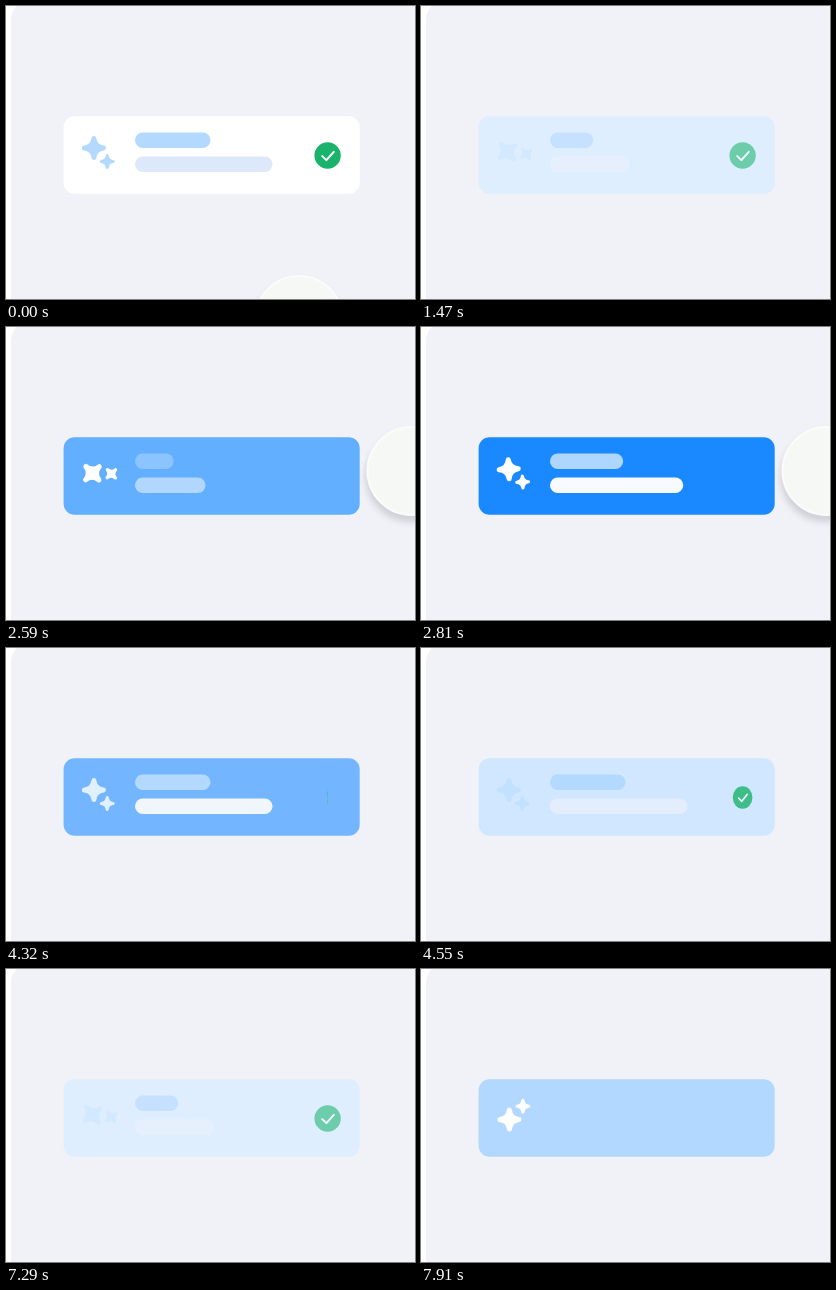
Write an HTML page that moves like this. It is 409 px wide and 293 px high and loops after 8 s.

```html
<!DOCTYPE html>
<html lang="en">
<head>
<meta charset="utf-8">
<title>Task card</title>
<style>
  html, body { margin: 0; width: 100%; height: 100%; overflow: hidden; background: #fff; }
  svg { display: block; width: 409px; height: 293px; }
  #disc { filter: drop-shadow(-1px 6px 3px rgba(110, 112, 115, .25)); }
</style>
</head>
<body>
<svg viewBox="0 0 409 293">
  <defs>
    <path id="star" d="M0-9.5Q1-1 9.5 0Q1 1 0 9.5Q-1 1-9.5 0Q-1-1 0-9.5Z" stroke-width="5" stroke-linejoin="round"/>
  </defs>
  <rect x="5" y="-6" width="430" height="320" rx="20" fill="#f0f2f8"/>
  <rect id="card" x="57.6" y="110.2" width="296.1" height="77.5" rx="11"/>
  <g id="stars">
    <use href="#star" x="-4.5" y="-4"/>
    <use href="#star" transform="translate(8.8 9.5) scale(.62)"/>
  </g>
  <g id="bars">
    <rect id="title" x="129" y="126.5" height="15.5" rx="7.75" fill="#b3d9ff"/>
    <rect id="line" x="129" y="150.5" height="15.5" rx="7.75"/>
  </g>
  <g id="check">
    <circle r="13.2" fill="#1ab36b"/>
    <path d="M-5.4.6-1.2 4.6 6.2-3.6" fill="none" stroke="#fff" stroke-width="2" stroke-linecap="round" stroke-linejoin="round"/>
  </g>
  <circle id="disc" r="44" fill="#f6f8f6" stroke="#fafbfa" stroke-width="2"/>
</svg>
<script>
const LOOP = 8000;

// Each phase advances in a few held poses, one every `frame` ms.
const leave = { start: 1470, frame: 155, poses: 5 };
const enter = { start: 2590, frame: 110, poses: 4 };
const finish = { start: 4180, frame: 118, poses: 5 };
const REPEAT = 7290;   // the leave phase begins again

const white = [255, 255, 255], light = [179, 216, 255], blue = [21, 134, 255];
const paleStar = [179, 217, 255], paleLine = [221, 233, 251];

const $ = id => document.getElementById(id);
const set = (id, attrs) => {
  for (const name in attrs) $(id).setAttribute(name, attrs[name]);
};
const clamp = x => Math.min(1, Math.max(0, x));
const easeOut = p => 1 - (1 - p) ** 2.5;
const mix = (a, b, k) => a.map((v, i) => v + (b[i] - v) * k);
const rgb = c => `rgb(${c.map(Math.round)})`;
const progress = (t, { start, frame, poses }) =>
  clamp((Math.floor((t - start) / frame) + 1) / poses);

function drawCheck(t, gone, done) {
  const turn = 0.8 * Math.PI * (1 - done);
  const swell = 0.08 * Math.sin(Math.PI * clamp((t - 4650) / 900));
  const back = gone === 1;
  const size = back ? 0.25 + 0.75 * done + swell : 1;
  const fold = back ? Math.abs(Math.cos(turn)) : 1;
  set('check', {
    opacity: 1 - gone + done,
    transform: `translate(321.6 149.5) scale(${size * fold} ${size})`
  });
}

function drawDisc(t) {
  const beside = t >= 2290 && t < 3140;
  const below = t < 810 || (t >= 3140 && t < 3400);
  set('disc', {
    cx: beside ? 405.5 : 293,
    cy: beside ? 144 : 314,
    opacity: +(beside || below)
  });
}

function draw(t) {
  const gone = easeOut(progress(t, leave));
  const back = easeOut(progress(t, enter));
  const done = progress(t, finish);
  const shown = 1 - gone + back;
  const glow = gone - done;
  const star = rgb(mix(paleStar, white, glow));
  const active = mix(mix(white, light, gone), blue, back);

  set('card', { fill: rgb(mix(active, white, done)) });
  set('stars', { fill: star, stroke: star, transform: `translate(92.4 146) rotate(${90 * (shown - 1)})` });
  set('bars', { opacity: shown });
  set('title', { width: 75.5 * shown });
  set('line', { width: 137.5 * shown, fill: rgb(mix(paleLine, white, glow)) });
  drawCheck(t, gone, done);
  drawDisc(t);
}

const begin = performance.now();
function tick() {
  const t = (performance.now() - begin) % LOOP;
  draw(t < REPEAT ? t : t - REPEAT + leave.start);
  requestAnimationFrame(tick);
}
tick();
</script>
</body>
</html>
```
